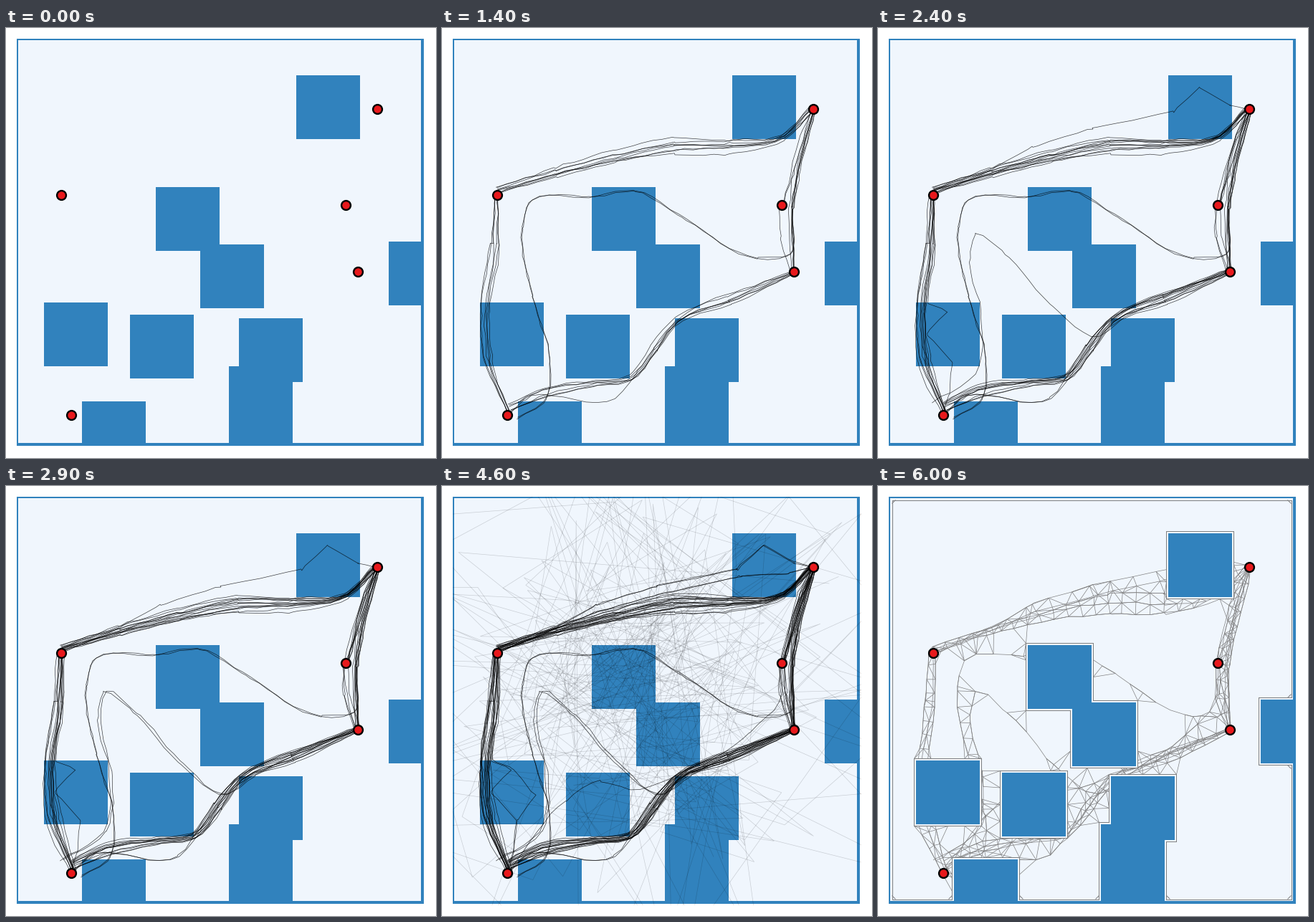
Animation, 600 px wide and 600 px high, one loop 7 s. Source, as a matplotlib script:

```python
import numpy as np
import matplotlib.pyplot as plt
from matplotlib.animation import FuncAnimation
from matplotlib.collections import LineCollection
from matplotlib.patches import Circle, Rectangle
from matplotlib.tri import Triangulation

SIZE, DPI, FRAMES, STEP_MS = 600, 100, 70, 100
BLUE, PALE, RED, GREY = "#3182bd", "#f0f6fd", "#e8191c", "#808080"
THIN = 0.5
KEPT_ALPHA = 0.75
ROUNDS, ROUND_LEN = 10, 5
FADE_START, FADE_LEN = 49, 11
SIDE = 89

# Noise share and opacity while a batch of paths is denoised
NOISE = [1.0, 0.9, 0.35, 0.0]
ALPHA = [0.16, 0.36, 0.55, KEPT_ALPHA]

A, B, C, D, E = (77, 233), (91, 540), (491, 340), (474, 247), (518, 113)
BLOCKS = [(405, 66), (209, 222), (271, 302), (534, 298), (53, 383),
          (173, 400), (325, 405), (311, 472), (106, 521)]

# Corridors: key points with half widths
TOP = [(77, 227, 4), (160, 202, 6), (245, 180, 8), (325, 165, 12),
       (400, 164, 10), (475, 153, 4), (517, 112, 4)]
LEFT = [(76, 230, 5), (73, 300, 9), (61, 395, 7), (67, 465, 9), (94, 538, 4)]
BOTTOM = [(94, 528, 6), (140, 507, 8), (210, 495, 4), (264, 487, 4),
          (296, 447, 6), (328, 408, 4), (400, 379, 6), (491, 340, 3)]
E_TO_C = [(518, 116, 4), (494, 205, 4), (488, 250, 3), (490, 338, 3)]
E_TO_D = [(517, 115, 4), (502, 150, 4), (475, 245, 3)]
D_TO_C = [(474, 247, 4), (477, 290, 5), (490, 339, 3)]
CORRIDORS = [TOP, LEFT, BOTTOM, E_TO_C, E_TO_D, D_TO_C]

# Single detours: smoothness and key points
OUTER_LOOP = 1, [(104, 545), (145, 518), (150, 460), (126, 375), (112, 280), (122, 243),
                 (205, 236), (270, 228), (335, 264), (440, 321), (485, 316), (488, 250), E]
INNER_LOOP = 1, [(78, 522), (138, 482), (146, 405), (130, 320), (137, 287),
                 (180, 316), (245, 388), (308, 430), (345, 405), C]
PEAK = 0, [A, (160, 197), (215, 166), (300, 139), (412, 116), (449, 82), (492, 107), E]
SHELF = 0, [A, (215, 176), (300, 152), (417, 126), (485, 122), E]
LOW = 1, [B, (115, 518), (240, 516), (272, 478), (325, 409), C]
HIGH = 1, [B, (172, 440), (220, 411), (262, 424), (325, 405), C]
ARC = 1, [D, (474, 295), (430, 345), (350, 402)]


def kink(apex):
    return 0, [A, (70, 383), (97, 395), apex, (105, 466), (100, 510), B]


DETOURS = {0: [OUTER_LOOP], 1: [OUTER_LOOP], 2: [LOW], 3: [kink((69, 426)), LOW],
           4: [PEAK, INNER_LOOP], 5: [INNER_LOOP], 6: [kink((130, 433)), PEAK],
           7: [SHELF], 8: [SHELF, HIGH, ARC], 9: [kink((69, 426))]}

rng = np.random.default_rng(7)


def spline(keys, step, smooth=1):
    """Cubic Hermite curve through the keys, sampled about every step pixels."""
    k = np.array(keys, float)
    s = np.r_[0, np.cumsum(np.hypot(*np.diff(k[:, :2], axis=0).T))]
    m = np.gradient(k, s, axis=0) * smooth
    t = np.union1d(s, np.linspace(0, s[-1], int(s[-1] / step) + 1))
    i = np.clip(np.searchsorted(s, t, "right") - 1, 0, len(s) - 2)
    h = (s[i + 1] - s[i])[:, None]
    u = (t - s[i])[:, None] / h
    blend = u * u * (3 - 2 * u)
    return ((1 - blend) * k[i] + blend * k[i + 1]
            + h * u * (1 - u) * ((1 - u) * m[i] - u * m[i + 1]))


def jitter(p, amount=0.7):
    return p + rng.normal(0, amount, p.shape)


def lane(keys, side, step=14):
    """A path along a corridor, drifting about one side of its middle."""
    k = spline(keys, step)
    tangent = np.gradient(k[:, :2], axis=0)
    normal = np.column_stack([-tangent[:, 1], tangent[:, 0]])
    normal /= np.hypot(*tangent.T)[:, None]
    drift = 0.35 * np.sin(np.linspace(0, 6, len(k)) + rng.uniform(0, 6))
    return jitter(k[:, :2] + normal * (k[:, 2] * (side + drift))[:, None])


def detour(smooth, keys, step=14):
    return jitter(spline(keys, step, smooth) + rng.normal(0, 0.8, 2))


def make_batch(r):
    if r < 2:
        plan = [TOP] * 3 + [LEFT] * 2 + [BOTTOM] * 2 + [E_TO_C] * 2
    else:
        plan = [TOP, LEFT, BOTTOM, E_TO_D] * 2 + [E_TO_C, D_TO_C]
    return ([lane(c, rng.uniform(-1, 1)) for c in plan]
            + [detour(*d) for d in DETOURS[r]])


batches = [make_batch(r) for r in range(ROUNDS)]
clouds = [[rng.normal((275, 275), 185, p.shape) for p in b] for b in batches]


def blocked(p, pad=2):
    return any(x - pad < p[0] < x + SIDE + pad and y - pad < p[1] < y + SIDE + pad
               for x, y in BLOCKS)


def build_mesh(gap=5, reach=32):
    """Rails along every corridor and detour, tied together by triangles."""
    rails = [lane(c, side, 19) for c in CORRIDORS for side in (-1, 0, 1)]
    singles = [OUTER_LOOP, INNER_LOOP, PEAK, SHELF, LOW, HIGH, ARC]
    rails += [detour(*d, 22) for d in singles]
    nodes = []
    for p in np.vstack(rails):
        if not blocked(p) and all(np.hypot(*(p - q)) >= gap for q in nodes):
            nodes.append(p)
    n_free = len(nodes)
    for x, y in BLOCKS:
        for k in np.linspace(-2.5, SIDE + 2.5, 5)[:-1]:
            nodes += [(x + k, y - 2.5), (x + SIDE + 2.5, y + k),
                      (x + SIDE - k, y + SIDE + 2.5), (x - 2.5, y + SIDE - k)]
    pts = np.array(nodes)
    edges = set()
    for tri in Triangulation(pts[:, 0], pts[:, 1]).triangles:
        sides = [tuple(sorted((tri[k], tri[k - 1]))) for k in range(3)]
        longest = max(np.hypot(*(pts[a] - pts[b])) for a, b in sides)
        if longest < reach and np.sum(tri >= n_free) <= 1:
            edges.update(sides)
    return [pts[list(e)] for e in sorted(edges)] + rails


def chamfers(d=5):
    lo, hi = 19.5, 576.5
    spots = [(lo, lo, 1, 1), (hi, lo, -1, 1), (lo, hi, 1, -1), (hi, hi, -1, -1)]
    for x, y in BLOCKS:
        if y + SIDE > hi or y == 472:
            spots += [(x - 2.5, hi, -1, -1), (x + SIDE + 2.5, hi, 1, -1)]
        if x + SIDE > hi:
            spots += [(hi, y - 2.5, -1, -1), (hi, y + SIDE + 2.5, -1, 1)]
    return [[(x + sx * d, y), (x, y + sy * d)] for x, y, sx, sy in spots]


fig = plt.figure(figsize=(SIZE / DPI, SIZE / DPI), dpi=DPI, facecolor="white")
ax = fig.add_axes([0, 0, 1, 1])
ax.set_xlim(0, SIZE)
ax.set_ylim(SIZE, 0)
ax.axis("off")


def region(lo, hi):
    return Rectangle((lo, lo), hi - lo, hi - lo, transform=ax.transData)


def box(x0, y0, x1, y1, color, z, clip=(15, 583)):
    r = Rectangle((x0, y0), x1 - x0, y1 - y0, fc=color, lw=0, zorder=z)
    ax.add_patch(r)
    r.set_clip_path(region(*clip))
    return r


def lines(color, z, segments=(), lw=THIN):
    c = LineCollection(segments, colors=color, linewidths=lw, zorder=z)
    ax.add_collection(c, autolim=False)
    c.set_clip_path(region(15, 585))
    return c


box(15, 15, 583, 583, BLUE, 0)
box(17, 17, 579, 579, PALE, 1)
mesh = lines(GREY, 2, build_mesh())
frame = [(19.5, 19.5), (576.5, 19.5), (576.5, 576.5), (19.5, 576.5), (19.5, 19.5)]
rim = lines(GREY, 3, [frame] + chamfers(), 0.72)

outlines = []
for x, y in BLOCKS:
    # The tall block and the bottom one run into the frame
    bottom = 583 if y > 470 else y + SIDE
    outlines.append(box(x - 3, y - 3, x + SIDE + 3, bottom + 3, PALE, 4, (19, 577)))
    box(x - 2, y - 2, x + SIDE + 2, bottom + 2, PALE, 5, (17, 579))
    box(x, y, x + SIDE, bottom, BLUE, 6)

kept = lines("black", 7)
active = lines("black", 8)
for x, y in (A, B, C, D, E):
    ax.add_patch(Circle((x + 0.5, y + 0.5), 6.4, fc=RED, ec="black",
                        lw=2.4 * 72 / DPI, zorder=9))


def mix(f):
    pale, grey = np.array([240, 246, 253]) / 255, np.full(3, 128) / 255
    return tuple(pale + (grey - pale) * f)


def draw(i):
    r, step = divmod(i - 1, ROUND_LEN)
    step = min(step, len(NOISE) - 1)
    fade = min(max((i - FADE_START) / FADE_LEN, 0), 1)
    moving = []
    if 0 <= r < ROUNDS:
        w = NOISE[step]
        moving = [(1 - w) * p + w * c for p, c in zip(batches[r], clouds[r])]
    kept.set_segments([p for b in batches[:max(r, 0)] for p in b])
    kept.set_alpha(KEPT_ALPHA * (1 - fade))
    active.set_segments(moving)
    active.set_alpha(ALPHA[step] * (1 - fade))
    mesh.set_alpha(fade)
    rim.set_alpha(fade)
    for o in outlines:
        o.set_facecolor(mix(fade))
    return kept, active, mesh, rim, *outlines


anim = FuncAnimation(fig, draw, frames=FRAMES, init_func=lambda: draw(0),
                     interval=STEP_MS, repeat=True, repeat_delay=0, blit=False)
plt.show()
```
